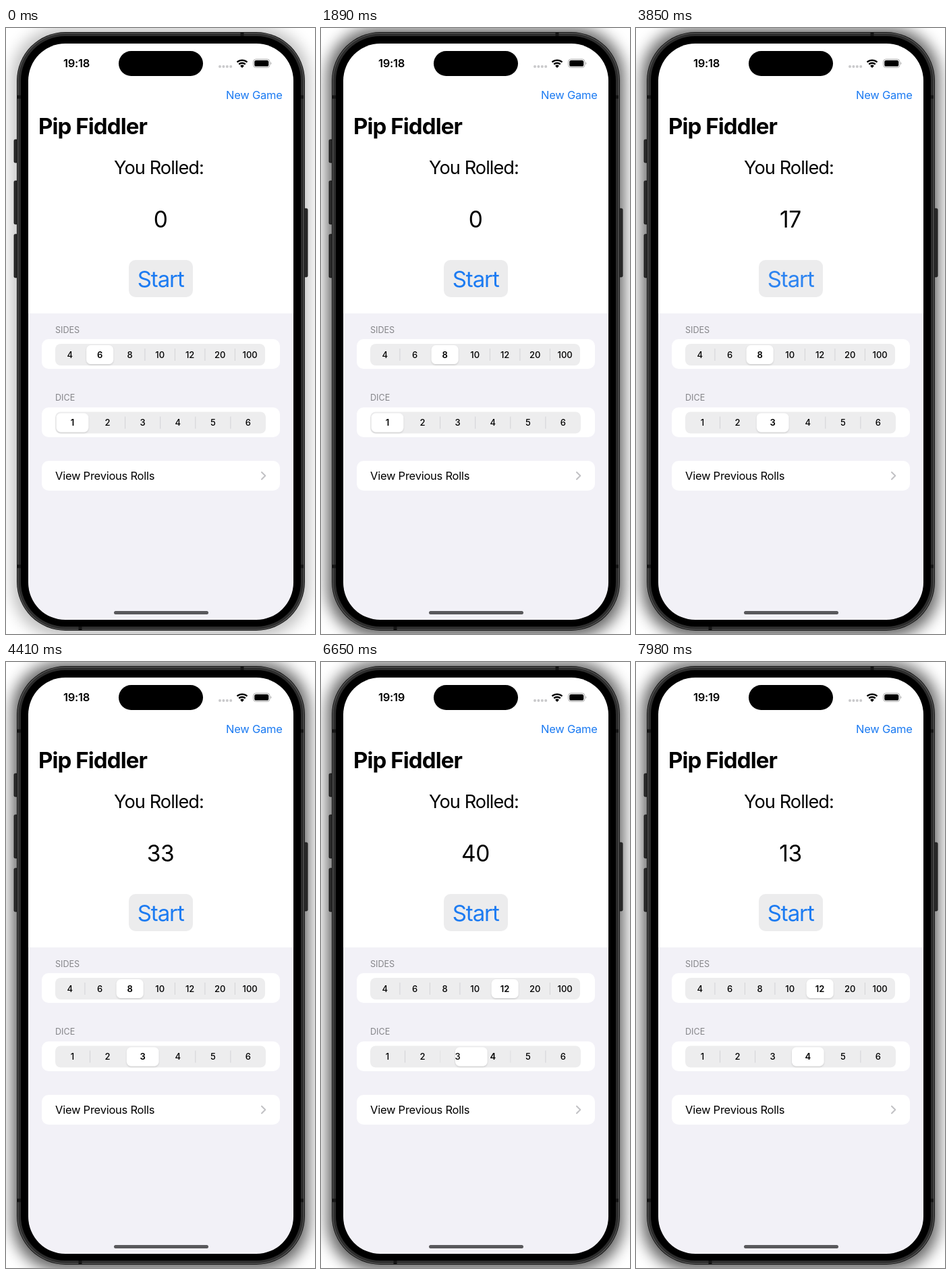
Animation of 458x896 px, one loop 8000 ms. Source, as an HTML page:

```html
<!DOCTYPE html>
<html lang="en">
<head>
<meta charset="utf-8">
<title>Pip Fiddler</title>
<style>
  html, body { margin: 0; width: 100%; height: 100%; overflow: hidden; background: #fff; }
  svg { display: block; font-family: Inter, Roboto, sans-serif; font-optical-sizing: none; }
  .body { font-size: 16.5px; letter-spacing: -.015em; }
  .large { font-size: 33px; letter-spacing: -.033em; }
  .label { font-size: 12.6px; fill: #858589; }
  .mid { text-anchor: middle; }
  .blue { fill: #1c7bf2; }
  .segment { font-size: 13px; font-weight: 500; text-anchor: middle; }
</style>
</head>
<body>
<svg width="458" height="896" viewBox="0 0 458 896">
  <defs>
    <filter id="blur" x="-20%" y="-20%" width="140%" height="140%"><feGaussianBlur stdDeviation="11"/></filter>
    <filter id="lift" x="-20%" y="-20%" width="140%" height="150%">
      <feDropShadow dx="0" dy="1.2" stdDeviation="1.2" flood-opacity=".16"/>
    </filter>
    <clipPath id="screen"><rect x="33" y="23" width="393" height="852" rx="55"/></clipPath>
  </defs>

  <rect width="458" height="896" fill="#fff"/>
  <rect id="shadow" x="9" y="0" width="440" height="900" rx="72" filter="url(#blur)"/>

  <g fill="#2a2a2a" stroke="#111" stroke-width=".8">
    <rect x="12" y="165" width="8" height="34" rx="1.5"/>
    <rect x="12" y="226" width="8" height="64" rx="1.5"/>
    <rect x="12" y="305" width="8" height="64" rx="1.5"/>
    <rect x="439" y="267" width="8" height="101" rx="1.5"/>
  </g>
  <rect x="16" y="6" width="427" height="885" rx="72" fill="#111"/>
  <rect x="17" y="7" width="425" height="883" rx="71" fill="#585858"/>
  <rect x="18.2" y="8.2" width="422.6" height="880.6" rx="70" fill="#2d2d2d"/>
  <path d="M350 7v5M110 885v5M17 102h5M17 796h5M436 102h5M436 796h5" stroke="#151515" stroke-width="5"/>
  <rect x="22" y="12" width="415" height="873" rx="66"/>

  <g clip-path="url(#screen)">
    <rect x="33" y="23" width="393" height="399" fill="#fff"/>
    <rect x="33" y="422" width="393" height="453" fill="#f2f1f7"/>
  </g>
  <rect x="167" y="34" width="125" height="37" rx="18.5"/>
  <rect x="160" y="862" width="140" height="5" rx="2.5" fill="#59595c"/>

  <text id="clock" class="body mid" x="104.5" y="58" font-weight="600"></text>
  <g fill="#c9c9cb">
    <circle cx="317" cy="57" r="2"/><circle cx="322.4" cy="57" r="2"/>
    <circle cx="327.8" cy="57" r="2"/><circle cx="333.2" cy="57" r="2"/>
  </g>
  <path d="M350 59l-2.9-3.1a4.2 4.2 0 0 1 5.8 0z"/>
  <path d="M345.2 53.6a7.1 7.1 0 0 1 9.6 0M342.5 50.5a11 11 0 0 1 15 0" fill="none" stroke="#000" stroke-width="2.3"/>
  <rect x="366.5" y="46.1" width="24.5" height="12.4" rx="4" fill="none" stroke="#aaa"/>
  <rect x="368.2" y="47.8" width="21.1" height="9" rx="2.6"/>
  <path d="M392.3 50.3q2.4 2 0 4z" fill="#aaa"/>

  <text class="body blue" x="326" y="105">New Game</text>
  <text x="48" y="157" font-size="33" font-weight="700" letter-spacing="-.9">Pip Fiddler</text>
  <text class="mid" x="226.5" y="215.5" font-size="27.2" letter-spacing="-.95">You Rolled:</text>
  <text id="total" class="mid" x="229" y="295" font-size="33.5" letter-spacing="-.4"></text>
  <rect x="182" y="343" width="95" height="55" rx="10" fill="#ececed"/>
  <text id="start" class="large mid blue" x="229.2" y="382.7">Start</text>

  <g fill="#fff">
    <rect x="53" y="460" width="353" height="44" rx="10"/>
    <rect x="53" y="561" width="353" height="44" rx="10"/>
    <rect x="53" y="640" width="353" height="44" rx="10"/>
  </g>
  <text class="label" x="73" y="451">SIDES</text>
  <text class="label" x="73" y="551">DICE</text>
  <text class="body" x="73" y="668">View Previous Rolls</text>
  <path d="M379 656.7l5.3 5.3-5.3 5.3" fill="none" stroke="#c2c2c5" stroke-width="2" stroke-linecap="round" stroke-linejoin="round"/>
  <g id="pickers"></g>
</svg>
<script>
const LOOP = 8000, STEP = 70;
const $ = id => document.getElementById(id);

function add(tag, attrs, text = '') {
  const el = document.createElementNS('http://www.w3.org/2000/svg', tag);
  for (const key in attrs) el.setAttribute(key, attrs[key]);
  el.textContent = text;
  return $('pickers').appendChild(el);
}

// Segmented control; moves are [time, selected index]
function picker(values, y, pitch, moves) {
  const left = 72.4, pillWidth = pitch - 4.6;
  const center = i => left + pitch * (i + .5);
  add('rect', { x: 73, y, width: pitch * values.length - .5, height: 32, rx: 8, fill: '#ededee' });
  const lines = values.slice(1).map((_, i) => add('rect', {
    x: left + pitch * (i + 1) - .5, y: y + 7, width: 1, height: 18, fill: '#d3d3d6' }));
  const pill = add('rect', { y: y + 2, width: pillWidth, height: 28, rx: 6.5, fill: '#fff', filter: 'url(#lift)' });
  const labels = values.map((v, i) => add('text', { class: 'segment', x: center(i), y: y + 20.7 }, v));

  return t => {
    const n = moves.findLastIndex(m => m[0] <= t);
    const [time, to] = moves[n], from = moves[Math.max(n - 1, 0)][1];
    const p = n ? spring(t - time + 88) : 1;
    pill.setAttribute('x', center(from + (to - from) * p) - pillWidth / 2);
    const shown = (i, selected) => i === selected || i + 1 === selected ? 0 : 1;
    lines.forEach((line, i) =>
      line.setAttribute('opacity', shown(i, from) * (1 - p) + shown(i, to) * p));
    labels.forEach((label, i) => label.style.fontWeight = i === to ? 600 : 500);
  };
}

// Critically damped spring, settled after about 440 ms
function spring(ms) {
  const x = ms * .0152;
  return ms > 435 ? 1 : 1 - (1 + x) * Math.exp(-x);
}

const slowRolls = [[4270, 22], [4410, 33], [4480, 18], [4550, 27], [4690, 40], [7980, 13]];
const tumble = t => 10 + Math.round(t / STEP) * 23 % 37;

function total(t) {
  if (t < 3640) return 0;
  if (t < 4270) return tumble(Math.min(t, 4130));
  if (t >= 7630 && t < 7980) return tumble(t);
  return slowRolls.findLast(r => r[0] <= t)[1];
}

function pressOpacity(t) {
  const since = t - (t < 7560 ? 3570 : 7560);
  return since < 0 ? 1 : Math.min(1, .25 + since / 420);
}

const sides = picker([4, 6, 8, 10, 12, 20, 100], 467, 44.5, [[0, 1], [1540, 2], [5880, 4]]);
const dice = picker([1, 2, 3, 4, 5, 6], 567.5, 52.1, [[0, 0], [2800, 2], [6650, 3]]);

function draw() {
  const t = Math.floor(performance.now() % LOOP / STEP) * STEP;
  $('shadow').setAttribute('opacity', t < 1400 ? .25 : .62);
  $('clock').textContent = t < 5110 ? '19:18' : '19:19';
  $('total').textContent = total(t);
  $('start').setAttribute('opacity', pressOpacity(t));
  sides(t);
  dice(t);
  requestAnimationFrame(draw);
}
draw();
</script>
</body>
</html>
```
